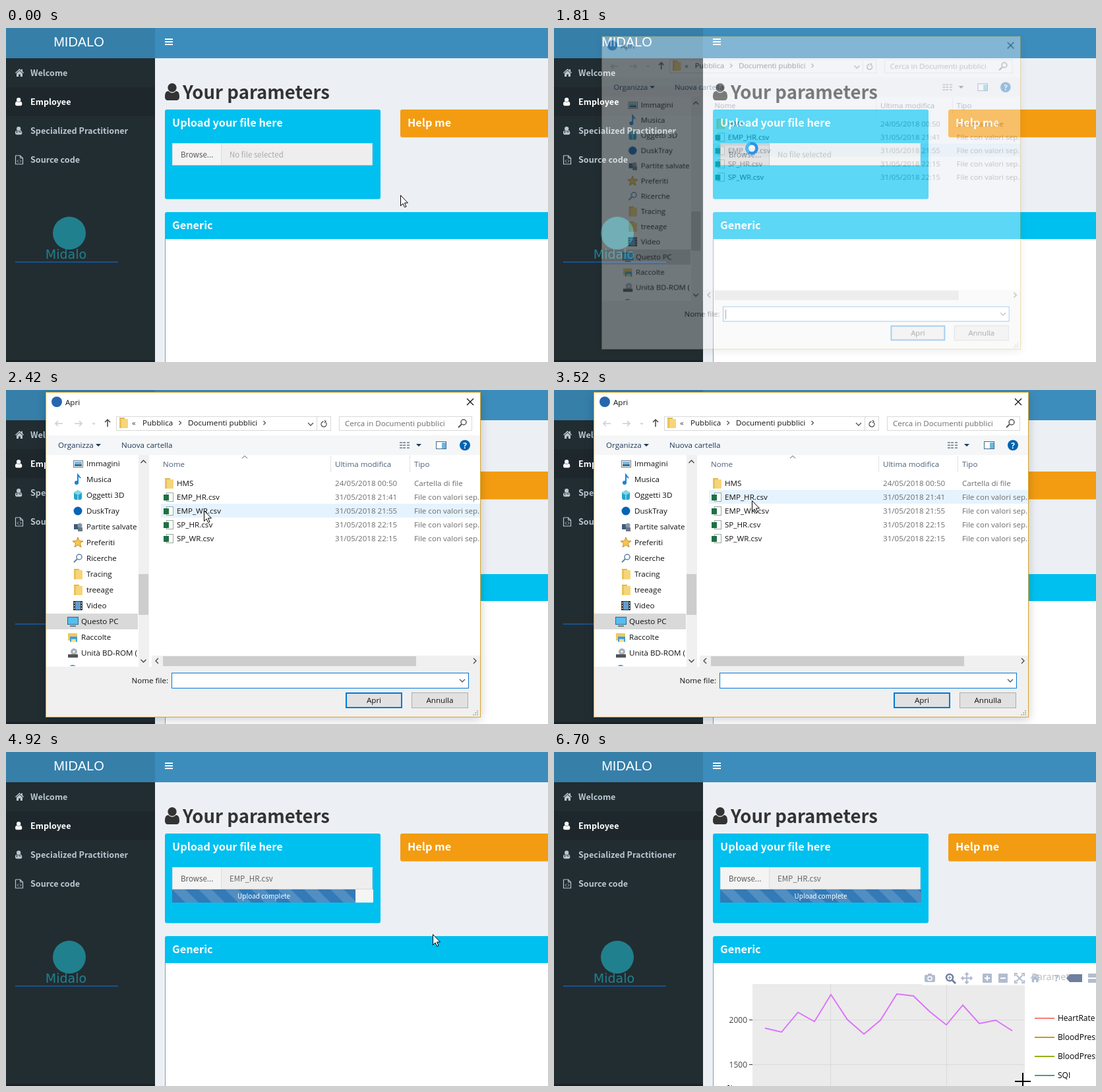
Write an HTML page with a canvas that moves like this. It is 822x508 px and loops after 7.02 s.

```html
<!DOCTYPE html>
<html lang="en">
<head>
<meta charset="utf-8">
<title>File upload demo</title>
<style>
html, body { margin: 0; width: 822px; height: 508px; overflow: hidden; background: #ecf0f5; }
canvas { display: block; }
</style>
</head>
<body>
<canvas id="stage" width="822" height="508"></canvas>
<script>
const LOOP = 7020, W = 822, H = 508;
const stage = document.getElementById('stage').getContext('2d');
const layer = Object.assign(document.createElement('canvas'), { width: W, height: H });
const layerContext = layer.getContext('2d');
let g = stage;

const SANS = '"Noto Sans CJK JP", "Noto Sans CJK", "Noto Sans", sans-serif';
const TITLE = `bold 16.3px ${SANS}`, MENU = `bold 12.6px ${SANS}`, LIGHT = `300 11.5px ${SANS}`;
const UI = '11.6px "Open Sans", "Noto Sans", sans-serif';
const PLOT = '12px "Open Sans", sans-serif';

// Drawing helpers
function rect(x, y, w, h, color, radius = 0) {
  g.fillStyle = color;
  g.beginPath();
  g.roundRect(x, y, w, h, radius);
  g.fill();
}
function frame(x, y, w, h, color, width = 1) {
  g.strokeStyle = color;
  g.lineWidth = width;
  g.strokeRect(x + width / 2, y + width / 2, w - width, h - width);
}
function text(str, x, y, font, color, align = 'left') {
  g.font = font;
  g.fillStyle = color;
  g.textAlign = align;
  g.fillText(str, x, y);
}
function line(points, color, width = 1) {
  g.strokeStyle = color;
  g.lineWidth = width;
  g.beginPath();
  points.forEach(([x, y]) => g.lineTo(x, y));
  g.stroke();
}
function disc(x, y, r, color) {
  g.fillStyle = color;
  g.beginPath();
  g.arc(x, y, r, 0, 7);
  g.fill();
}
function ring(x, y, r, color, width, from = 0, to = 2 * Math.PI) {
  g.strokeStyle = color;
  g.lineWidth = width;
  g.beginPath();
  g.arc(x, y, r, from, to);
  g.stroke();
}
function shape(path, x, y, color, scale = 1, outline) {
  g.save();
  g.translate(x, y);
  g.scale(scale, scale);
  g.fillStyle = color;
  g.fill(path);
  if (outline) {
    g.strokeStyle = outline;
    g.lineWidth = 1;
    g.stroke(path);
  }
  g.restore();
}
function clipped(x, y, w, h, draw) {
  g.save();
  g.beginPath();
  g.rect(x, y, w, h);
  g.clip();
  draw();
  g.restore();
}
// dx, dy: where the chevron points
function chevron(x, y, dx, dy, color, size = 4, width = 1.3) {
  const a = size / 2;
  line([[x - dx * a - dy * size, y - dy * a - dx * size], [x + dx * a, y + dy * a],
    [x - dx * a + dy * size, y - dy * a + dx * size]], color, width);
}

// Timing helpers
const mix = (a, b, p) => a + (b - a) * p;
const easeOut = p => 1 - (1 - p) ** 2;
function stepped(t, from, to, count) {
  const gap = (to - from) / (count - 1);
  return Math.min(count, Math.max(0, Math.floor((t - from + 8) / gap) + 1)) / count;
}

const USER = new Path2D('M11 0A6.6 6.6 0 0 1 11 13.4A6.6 6.6 0 0 1 11 0ZM0 21C0 14 2 12 5.5 12C9 15.5 13 15.5 16.5 12C20 12 22 14 22 21C22 24 20 26 17.5 26H4.5C2 26 0 24 0 21Z');
const HOME = new Path2D('M6.5 0L9 2.2V.8H11V4L13 6L12.2 7L6.5 2L.8 7L0 6ZM6.5 3L11 7V12H7.8V8.5H5.2V12H2V7Z');
const ARROW = new Path2D('M.5 .5V16.5L4 13L6.6 18.6L9 17.6L6.5 12H11.5Z');
const HAND = new Path2D('M-1.5 1Q0-1 1.5 1V7Q8 7 9.5 9.5V14L7.5 19H-2.5L-7 11.5Q-6 9-1.5 12Z');
const STAR = new Path2D('M0-8L2.2-2.5L8-2.2L3.4 1.3L5 7L0 3.8L-5 7L-3.4 1.3L-8-2.2L-2.2-2.5Z');

function fileIcon(x, y, color) {
  line([[x, y], [x + 7, y], [x + 11, y + 4], [x + 11, y + 13], [x, y + 13], [x, y]], color, 1.2);
  line([[x + 7, y], [x + 7, y + 4], [x + 11, y + 4]], color);
  chevron(x + 3.5, y + 8.5, -1, 0, color, 2, 1);
  chevron(x + 7.5, y + 8.5, 1, 0, color, 2, 1);
}

function drawSidebar() {
  rect(0, 0, 226, 46, '#367fa9');
  rect(226, 0, 596, 46, '#3c8dbc');
  rect(0, 46, 226, 462, '#222d32');
  rect(0, 90, 226, 44, '#1e282c');
  rect(0, 505, 226, 3, '#1a2226');
  text('MIDALO', 110.5, 27.5, '20px "Liberation Sans", Arial, sans-serif', '#fff', 'center');
  for (let i = 0; i < 3; i++) rect(241, 16 + i * 4, 12, 2, '#fff');
  const soft = '#b8c7ce';
  ['Welcome', 'Employee', 'Specialized Practitioner', 'Source code'].forEach((label, i) =>
    text(label, 37, 73 + 44 * i, MENU, i === 1 ? '#fff' : soft));
  shape(HOME, 14, 62, soft);
  shape(USER, 14, 106, '#fff', 0.47);
  shape(USER, 14, 150, soft, 0.47);
  line([[16.5, 156], [16.5, 160]], '#222d32');
  line([[19, 158], [23, 158]], '#222d32');
  fileIcon(14.5, 194, soft);
  disc(96, 312, 25, '#21808e');
  text('Midalo', 91, 351, '19px "DejaVu Sans", sans-serif', '#21808e', 'center');
  rect(14, 355, 156, 2, '#1b5189');
}

function drawCard(x, y, w, h, color, title) {
  rect(x, y + 1, w, h, 'rgba(0,0,0,.1)', 3);
  rect(x, y, w, h, color, 3);
  text(title, x + 11, y + 26, TITLE, '#fff');
}

function drawProgress(t) {
  const grown = 278 * easeOut(stepped(t, 4070, 4530, 7));
  const width = t >= 5450 ? 305 : grown;
  rect(252, 209, 305, 20, '#f5f5f5', 1);
  clipped(252, 209, width, 20, () => {
    rect(252, 209, 305, 20, '#337ab7');
    g.fillStyle = 'rgba(255,255,255,.15)';
    for (let x = 252; x < 557; x += 40) {
      g.beginPath();
      g.moveTo(x, 209);
      g.lineTo(x + 20, 209);
      g.lineTo(x + 40, 229);
      g.lineTo(x + 20, 229);
      g.fill();
    }
    text('Upload complete', 252 + width / 2, 223, `10px ${SANS}`, '#fff', 'center');
  });
}

function drawUpload(t) {
  const uploaded = t >= 3912;
  const pressed = t >= 1500 && !uploaded;
  const hovered = t >= 1192 && t < 4220;
  rect(326, 175, 230, 34, '#eee');
  frame(326, 175, 230, 34, '#d2d6de');
  rect(252, 175, 75, 34, pressed ? '#d4d4d4' : hovered ? '#e7e7e7' : '#f4f4f4', 3);
  frame(252, 175, 75, 34, hovered ? '#adadad' : '#ddd');
  if (pressed) rect(253, 176, 73, 3, 'rgba(0,0,0,.09)');
  text('Browse...', 265, 197, LIGHT, '#555');
  text(uploaded ? 'EMP_HR.csv' : 'No file selected', 339, 197, LIGHT, uploaded ? '#666' : '#aaa');
  if (uploaded) drawProgress(t);
}

function drawModebar() {
  rect(558, 333, 264, 22, 'rgba(255,255,255,.7)');
  const pale = '#b2bccf', strong = '#6f7f9f', y = 344;
  rect(562, 339, 16, 11, pale, 2);
  rect(567, 337, 6, 3, pale);
  ring(570, 344.5, 3, '#fff', 1.5);
  ring(600, 343, 5, strong, 2.5);
  line([[604, 347], [609, 352]], strong, 3);
  line([[597.5, 343], [602.5, 343]], strong);
  line([[600, 340.5], [600, 345.5]], strong);
  line([[619, y], [633, y]], pale, 2);
  line([[626, 337], [626, 351]], pale, 2);
  [[1, 0], [-1, 0], [0, 1], [0, -1]].forEach(([dx, dy]) =>
    chevron(626 + dx * 6.5, y + dy * 6.5, dx, dy, pale, 2.5, 2));
  [657, 681].forEach((x, i) => {
    rect(x - 7, 337, 14, 14, pale, 1);
    rect(x - 4, 343, 8, 2, '#fff');
    if (!i) rect(x - 1, 340, 2, 8, '#fff');
  });
  frame(698, 336, 16, 16, pale, 2);
  rect(703, 335, 6, 18, '#fff');
  rect(697, 341, 18, 6, '#fff');
  line([[701, 339], [711, 349]], pale, 2);
  line([[711, 339], [701, 349]], pale, 2);
  shape(HOME, 722.5, 337, pale, 1.1);
  text('?', 762, 349, 'bold 14px "Open Sans", sans-serif', pale, 'center');
  g.fillStyle = strong;
  g.beginPath();
  [[777, 344], [782, 338], [801, 338], [801, 350], [782, 350]].forEach(p => g.lineTo(...p));
  g.fill();
  rect(810, 337, 12, 6, pale);
  rect(810, 345, 12, 6, pale);
}

function drawChart(withModebar) {
  rect(301, 353, 413, 155, '#ebebeb');
  [[407, '2000'], [475, '1500']].forEach(([y, label]) => {
    rect(301, y, 413, 1, '#d9d9d9');
    rect(296, y, 5, 1, '#333');
    text(label, 293, y + 5, PLOT, '#444', 'right');
  });
  [419, 595].forEach(x => rect(x, 353, 1, 155, '#d9d9d9'));
  const heights = [420, 426, 396, 410, 369, 407, 429, 408, 368, 371, 395, 415, 385, 413, 408, 424];
  line(heights.map((y, i) => [320 + 25 * i, y]), '#db72fb', 1.9);
  g.save();
  g.translate(270, 506);
  g.rotate(-Math.PI / 2);
  text('Value', 0, 0, '14.6px "Open Sans", sans-serif', '#000', 'right');
  g.restore();
  text('Parameter', 724, 347, '14.6px "Open Sans", sans-serif', '#222');
  const legend = [['HeartRate', '#f8766d'], ['BloodPressure1', '#d39200'],
    ['BloodPressure2', '#93aa00'], ['SQI', '#3f9890']];
  legend.forEach(([label, color], i) => {
    line([[729, 405 + 29 * i], [759, 405 + 29 * i]], color, 1.9);
    text(label, 764, 409 + 29 * i, PLOT, '#000');
  });
  if (withModebar) drawModebar();
}

function drawPage(t, pointer) {
  rect(0, 0, W, H, '#ecf0f5');
  drawSidebar();
  shape(USER, 241, 84, '#333');
  text('Your parameters', 268, 108, `bold 27.5px ${SANS}`, '#333');
  drawCard(241, 124, 327, 136, '#00c0ef', 'Upload your file here');
  drawCard(598, 124, 240, 42, '#f39c12', 'Help me');
  drawUpload(t);
  rect(241, 283, 581, 225, '#fff');
  rect(241, 321, 1, 187, '#8a9ca3');
  rect(241, 280, 590, 41, '#00c0ef', [3, 0, 0, 0]);
  text('Generic', 252, 306, TITLE, '#fff');
  if (t >= 5450) drawChart(pointer.y > 333);
}

// Dialog icons, drawn around their centre
const folder = (x, y) => {
  rect(x - 6, y - 8, 8, 5, '#e3b94e');
  rect(x - 6, y - 6, 13, 14, '#f6d579', 1);
  rect(x - 6, y - 6, 3, 14, '#e9c25c');
};
const magnifier = (x, y, color = '#5d83a3') => {
  ring(x + 2, y - 2, 4, color, 1.5);
  line([[x - 1, y + 1], [x - 6, y + 6]], color, 2);
};
const picture = (x, y) => {
  rect(x - 7, y - 5, 15, 11, '#fff');
  frame(x - 7, y - 5, 15, 11, '#777');
  rect(x - 5, y - 3, 11, 4, '#75b9e8');
  rect(x - 5, y + 1, 11, 3, '#396f8c');
};
const note = (x, y) => {
  disc(x - 2, y + 5, 3, '#1683d8');
  line([[x, y + 5], [x, y - 7], [x + 4, y - 2]], '#1683d8', 2);
};
const cube = (x, y) => {
  rect(x - 6, y - 5, 12, 12, '#25a5c8', 3);
  shape(new Path2D('M0-8L7-4L0 0L-7-4Z'), x, y, '#7ed6e8');
  line([[x, y], [x, y + 7]], '#d0f2f7');
};
const chip = (x, y) => {
  rect(x - 6, y - 4, 7, 8, '#405b7a');
  disc(x + 3, y - 2, 3.5, '#8795a5');
  rect(x, y + 1, 7, 6, '#6a7885');
};
const film = (x, y) => {
  rect(x - 7, y - 7, 14, 14, '#333');
  rect(x - 4, y - 6, 8, 12, '#5f9fd0');
  for (let i = -5; i < 7; i += 4) {
    rect(x - 6, y + i, 1, 2, '#fff');
    rect(x + 5, y + i, 1, 2, '#fff');
  }
};
const monitor = (x, y) => {
  rect(x - 8, y - 7, 17, 12, '#276a94');
  rect(x - 7, y - 6, 15, 10, '#55bdf0');
  rect(x - 4, y + 6, 9, 2, '#667987');
};
const library = (x, y) => {
  rect(x - 7, y - 6, 14, 11, '#f0c860');
  rect(x - 4, y - 1, 11, 8, '#3ba1df');
  rect(x - 2, y + 3, 7, 4, '#f7dc8c');
};
const drive = (x, y) => {
  disc(x + 2, y - 2, 5, '#a9b3ba');
  disc(x + 2, y - 2, 1.5, '#fff');
  rect(x - 7, y + 2, 15, 5, '#555');
};

const PLACES = [['Immagini', picture], ['Musica', note], ['Oggetti 3D', cube],
  ['DuskTray', (x, y) => disc(x, y, 6.5, '#0a64b4')], ['Partite salvate', chip],
  ['Preferiti', (x, y) => shape(STAR, x, y, '#f7c64f', 1, '#c58d20')], ['Ricerche', magnifier],
  ['Tracing', folder], ['treeage', folder], ['Video', film], ['Questo PC', monitor],
  ['Raccolte', library], ['Unità BD-ROM (', drive], ['Rete', (x, y) => disc(x, y, 6, '#4a9bc9')]];
const FILES = [['HMS', '24/05/2018 00:50'], ['EMP_HR.csv', '31/05/2018 21:41'],
  ['EMP_WR.csv', '31/05/2018 21:55'], ['SP_HR.csv', '31/05/2018 22:15'], ['SP_WR.csv', '31/05/2018 22:15']];

function drawPlaces() {
  clipped(61, 99, 140, 321, () => {
    rect(61, 340, 139, 24, '#d9d9d9');
    PLACES.forEach(([label, icon], i) => {
      const y = 112 + 24 * i, indent = i < 10 ? 8 : 0;
      icon(101 + indent, y);
      text(label, 114 + indent, y + 4, UI, '#111');
    });
  });
  rect(201, 99, 16, 322, '#f0f0f0');
  rect(201, 280, 15, 62, '#cdcdcd');
  chevron(208.5, 109, 0, -1, '#444');
  chevron(208.5, 412, 0, 1, '#444');
}

function drawFiles(hovered, selected) {
  chevron(362, 102, 0, -1, '#666', 4, 1);
  [['Nome', 238], ['Ultima modifica', 499], ['Tipo', 619]].forEach(([label, x]) =>
    text(label, x, 117, UI, '#4c607a'));
  [492, 612].forEach(x => rect(x, 100, 1, 25, '#e2e2e2'));
  clipped(220, 126, 499, 270, () => {
    rect(235, 152 + 21 * (hovered - 1), 490, 21, selected ? '#cce8ff' : '#e5f3ff');
    FILES.forEach(([name, date], i) => {
      const y = 142 + 21 * i;
      if (i) {
        rect(243, y - 7, 11, 14, '#fff');
        frame(243, y - 7, 11, 14, '#99a7a0');
        rect(239, y - 4, 8, 9, '#1e7145');
      } else folder(247, y);
      text(name, 259, y + 4, UI, '#111');
      text(date, 499, y + 4, UI, '#6d6d6d');
      text(i ? 'File con valori sep...' : 'Cartella di file', 619, y + 4, UI, '#6d6d6d');
    });
  });
  rect(221, 404, 498, 17, '#f0f0f0');
  rect(238, 405, 384, 15, '#cdcdcd');
  chevron(229, 412, -1, 0, '#444');
  chevron(711, 412, 1, 0, '#444');
}

function drawToolbars() {
  disc(77, 18, 8, '#2567ae');
  text('Apri', 90, 23, UI, '#111');
  line([[699, 13], [709, 23]], '#111', 1.2);
  line([[709, 13], [699, 23]], '#111', 1.2);
  [[81, -1, 0, '#ccc'], [109, 1, 0, '#ccc'], [154, 0, -1, '#444']].forEach(([x, dx, dy, color]) => {
    line([[x - dx * 5, 51 - dy * 5], [x + dx * 5, 51 + dy * 5]], color, 1.5);
    chevron(x + dx * 4, 51 + dy * 4, dx, dy, color, 4, 1.5);
  });
  chevron(133, 51, 0, 1, '#ccc', 2);
  frame(167, 40, 326, 22, '#d9d9d9');
  rect(471, 41, 1, 20, '#d9d9d9');
  folder(178, 50);
  text('«', 191, 54, UI, '#444');
  text('Pubblica', 207, 54, UI, '#111');
  text('Documenti pubblici', 276, 54, UI, '#111');
  [264, 392].forEach(x => chevron(x, 50, 1, 0, '#555', 3));
  chevron(462, 52, 0, 1, '#555');
  ring(482, 52, 4, '#555', 1.4, -0.6, 4.6);
  chevron(484, 48, 1, 0, '#555', 2);
  frame(505, 40, 202, 22, '#d9d9d9');
  text('Cerca in Documenti pubblici', 514, 55, UI, '#6d6d6d');
  magnifier(692, 51, '#555');
  rect(61, 69, 658, 30, '#f5f6f7');
  text('Organizza', 79, 88, UI, '#1e395b');
  text('Nuova cartella', 175, 88, UI, '#1e395b');
  [140, 626].forEach(x => shape(new Path2D('M-4-2H4L0 2Z'), x, 84, '#1e395b'));
  for (let y = 79; y < 91; y += 4) {
    for (const x of [597, 602, 608]) rect(x, y, 4, 2, '#8a97a6');
  }
  rect(652, 78, 16, 12, '#fff');
  frame(652, 78, 16, 12, '#476b8a');
  rect(661, 80, 6, 9, '#69b7e0');
  disc(696, 84, 8, '#0063b1');
  text('?', 696, 88.5, 'bold 12px "Open Sans", sans-serif', '#fff', 'center');
}

function drawDialog(t, pointer) {
  g.clearRect(0, 0, W, H);
  g.save();
  g.shadowColor = 'rgba(0,0,0,.2)';
  g.shadowBlur = 14;
  g.shadowOffsetY = 3;
  rect(60, 3, 660, 495, '#fff');
  g.restore();
  const selected = t >= 3670;
  drawToolbars();
  drawPlaces();
  drawFiles(pointer.y < 173 ? 1 : 2, selected);
  rect(61, 421, 658, 76, '#f0f0f0');
  text('Nome file:', 246, 446, UI, '#111', 'right');
  rect(251, 430, 451, 24, '#fff');
  frame(251, 430, 451, 24, '#0078d7');
  chevron(692, 442, 0, 1, '#555');
  if (selected) text('EMP_HR.csv', 255, 446, UI, '#111');
  else if (t < 2420 || (t >= 2962 && t < 3520)) rect(255, 435, 1, 15, '#000');
  [['Apri', 515, 86], ['Annulla', 615, 86]].forEach(([label, x, w], i) => {
    rect(x, 460, w, 24, '#e1e1e1');
    frame(x, 460, w, 24, i ? '#adadad' : '#0078d7', i ? 1 : 2);
    text(label, x + w / 2, 476, UI, '#111', 'center');
  });
  for (let i = 0; i < 3; i++) {
    for (let j = 0; j <= i; j++) rect(714 - 3 * j, 487 + 3 * i, 2, 2, '#bbb');
  }
  frame(60, 3, 660, 495, '#d9a52c');
}

function showDialog(t, pointer) {
  const opened = easeOut(stepped(t, 1810, 2120, 5));
  const closed = stepped(t, 3840, 4070, 4);
  if (!opened || closed === 1) return;
  g = layerContext;
  drawDialog(t, pointer);
  g = stage;
  const scale = mix(0.943, 1, opened) - 0.0645 * closed;
  g.save();
  g.globalAlpha = opened * (1 - closed) ** 2.6;
  g.translate(390, 250.5);
  g.scale(scale, scale);
  g.drawImage(layer, -390, -250.5);
  g.restore();
}

// Each move: start, end, number of steps, destination
const MOVES = [[810, 1200, 6, 300, 183], [2820, 2970, 3, 300, 168], [4070, 4530, 7, 365, 183],
  [4610, 4920, 5, 647, 277], [5770, 6170, 6, 707, 456], [6620, 6700, 2, 711, 500]];

function pointerAt(t) {
  let x = 598, y = 254;
  for (const [from, to, count, toX, toY] of MOVES) {
    const p = stepped(t, from, to, count);
    x = mix(x, toX, p);
    y = mix(y, toY, p);
  }
  return { x: Math.round(x), y: Math.round(y) };
}

function drawPointer(t, { x, y }) {
  if (t >= 5450 && y > 353) {
    rect(x - 12, y, 24, 2, '#000');
    rect(x - 1, y - 12, 2, 24, '#000');
  } else if (t >= 1572 && t < 1882) {
    disc(x, y, 7, 'rgba(255,255,255,.75)');
    ring(x, y, 7.5, '#2b94ee', 4.5);
    ring(x, y, 7.5, '#4bb8f7', 4.5, 2.2, 4.4);
  } else if (t >= 1192 && t < 1572) {
    shape(HAND, x, y, '#fff', 1, '#000');
  } else {
    shape(ARROW, x, y, '#fff', 1, '#000');
  }
}

function render() {
  const t = performance.now() % LOOP;
  const pointer = pointerAt(t);
  drawPage(t, pointer);
  showDialog(t, pointer);
  drawPointer(t, pointer);
  requestAnimationFrame(render);
}
render();
</script>
</body>
</html>
```
